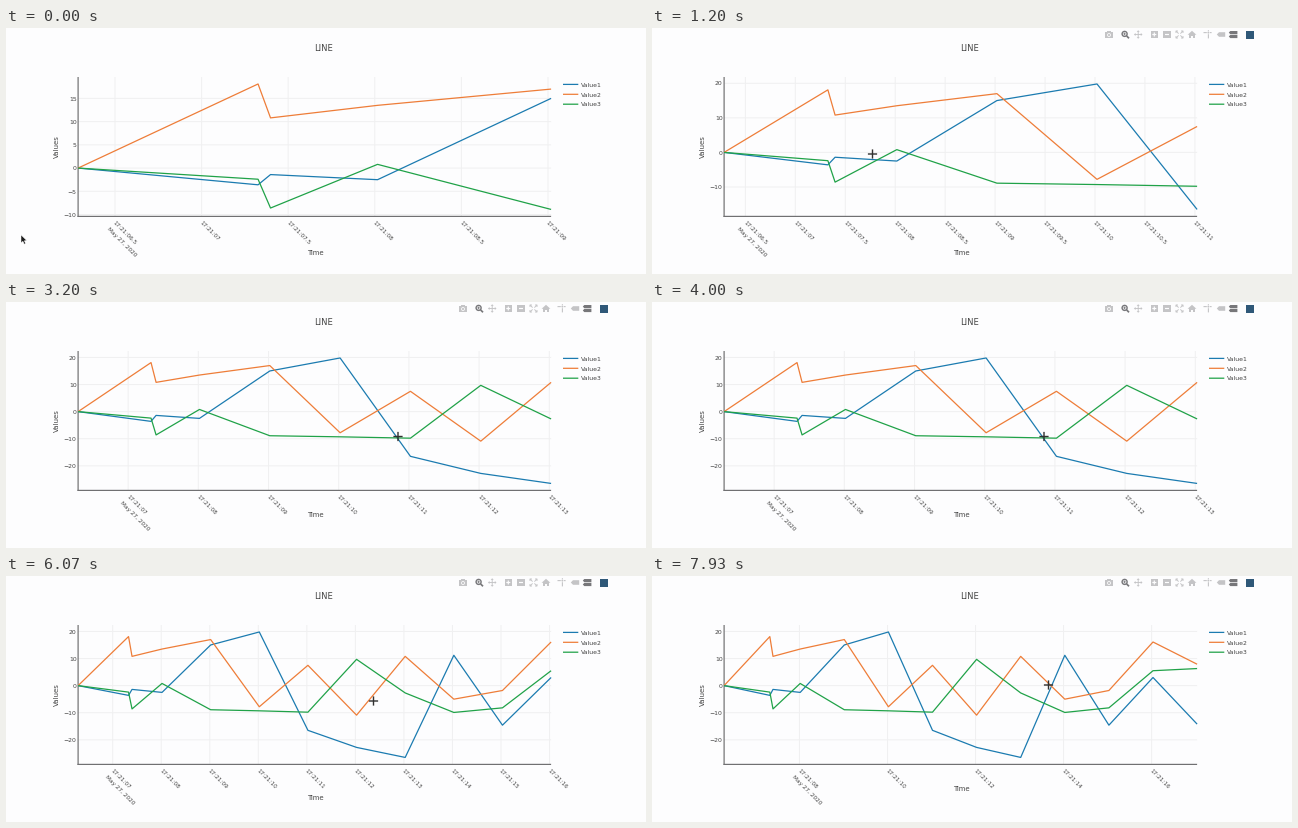
Animation, 640 px wide and 246 px high, one loop 8 s. Source, as a matplotlib script:

```python
import math

import matplotlib.pyplot as plt
from matplotlib.animation import FuncAnimation
from matplotlib.patches import Circle, Polygon, Rectangle

W, H, DPI = 640, 246, 100
FRAMES, STEP = 160, 50
L, R, T, B = 72.1, 545.1, 49.0, 188.4
BG, INK, GRID, AXIS = "#fdfdfe", "#444444", "#f0f0f1", "#707072"
PALE, DARK = "#c4c4c6", "#77777a"
SANS, ARIAL = "DejaVu Sans", "Liberation Sans"

# seconds after 17:21:00
TIMES = [6.287, 7.326, 7.398] + [n * 1.002 for n in range(8, 18)]
SERIES = [
    ("Value1", "#1b7bb0", "white",
     [0, -3.6, -1.4, -2.5, 15, 19.8, -16.5, -22.8, -26.5, 11.2, -14.6, 3, -14.2]),
    ("Value2", "#ee7d38", INK,
     [0, 18.1, 10.8, 13.5, 17, -7.8, 7.5, -10.9, 10.8, -5, -1.8, 16.1, 7.9]),
    ("Value3", "#20a248", "white",
     [0, -2.4, -8.6, 0.8, -8.9, -9.3, -9.8, 9.7, -2.7, -9.9, -8.2, 5.5, 6.3]),
]
# time, x, y of the pointer
PATH = [(0, 15, 206.8), (0.2, 15, 206.8), (0.85, 220.5, 126), (1.4, 220.5, 126),
        (1.95, 274, 131), (2.72, 274, 131), (3.03, 392, 134.5),
        (4.15, 392, 134.5), (4.6, 367.5, 125), (6.4, 367.5, 125),
        (6.9, 396.5, 109), (8, 396.5, 109)]

fig = plt.figure(figsize=(W / DPI, H / DPI), dpi=DPI, facecolor=BG)
ax = fig.add_axes([0, 0, 1, 1])
ax.set_xlim(0, W)
ax.set_ylim(H, 0)
ax.axis("off")
live = []


def px(size):
    return size * 72 / DPI


def line(xs, ys, color, width=1.0, z=2):
    return ax.plot(xs, ys, color=color, lw=px(width), zorder=z, snap=False,
                   solid_capstyle="butt", solid_joinstyle="round")[0]


def label(x, y, s, size, color=INK, ha="left", font=SANS, z=5, rot=0):
    """Text whose capitals are centred on y (or on the turned midline)."""
    a = math.radians(rot)
    d = 0.36 * size
    return ax.text(x + d * math.sin(a), y + d * math.cos(a), s, fontsize=px(size),
                   color=color, ha=ha, va="baseline", family=font, rotation=rot,
                   rotation_mode="anchor", zorder=z)


def poly(pts, fill, edge="none", width=0.0, z=5):
    return ax.add_patch(Polygon(pts, closed=True, fc=fill, ec=edge,
                                lw=px(width), zorder=z))


def box(x, y, w, h, fill, z=5):
    return ax.add_patch(Rectangle((x, y), w, h, fc=fill, ec="none", lw=0, zorder=z))


def disc(x, y, r, fill, edge="none", width=0.0):
    return ax.add_patch(Circle((x, y), r, fc=fill, ec=edge, lw=px(width), zorder=5))


def toolbar():
    y = 6.5
    parts = [box(453, 4.3, 8, 5.5, PALE), box(455.3, 3.2, 3.4, 1.4, PALE),
             disc(457, 7, 1.9, BG), disc(457, 7, 1.1, PALE)]
    # magnifier
    parts += [disc(472.6, 5.9, 2.5, BG, DARK, 1.4),
              line([474.6, 477], [7.9, 10.3], DARK, 1.7, 5),
              line([471.3, 473.9], [5.9, 5.9], DARK, 0.8, 6),
              line([472.6, 472.6], [4.6, 7.2], DARK, 0.8, 6)]
    # four-way arrows
    parts += [line([483, 489.4], [y, y], PALE, 0.9),
              line([486.2, 486.2], [3.3, 9.7], PALE, 0.9)]
    for dx, dy in ((1, 0), (-1, 0), (0, 1), (0, -1)):
        cx, cy = 486.2 + 2.6 * dx, y + 2.6 * dy
        parts.append(poly([(cx + 1.7 * dx, cy + 1.7 * dy),
                           (cx + 1.5 * dy, cy + 1.5 * dx),
                           (cx - 1.5 * dy, cy - 1.5 * dx)], PALE))
    # plus and minus boxes
    for cx in (502.3, 515):
        parts += [box(cx - 3.6, y - 3.6, 7.2, 7.2, PALE),
                  line([cx - 2, cx + 2], [y, y], BG, 1.2, 6)]
    parts.append(line([502.3, 502.3], [y - 2, y + 2], BG, 1.2, 6))
    # autoscale
    for sx in (-1, 1):
        for sy in (-1, 1):
            cx, cy = 527.5 + 3.5 * sx, y + 3.5 * sy
            parts += [line([cx - 2 * sx, cx, cx], [cy, cy, cy - 2 * sy], PALE, 0.9),
                      line([527.5 + 0.9 * sx, cx], [y + 0.9 * sy, cy], PALE, 0.9)]
    # home
    parts += [poly([(535.6, 6.8), (540, 2.8), (544.4, 6.8)], PALE),
              box(537, 6.3, 6, 3.8, PALE), box(539.3, 7.6, 1.4, 2.5, BG, z=6)]
    # spike lines
    parts += [line([551.5, 554.8], [4.6, 4.6], PALE, 1.1), disc(556.4, 4.6, 1, PALE),
              line([558, 559.6], [4.6, 4.6], PALE, 1.1),
              line([556.4, 556.4], [2.2, 3.2], PALE, 1.1),
              line([556.4, 556.4], [6.2, 10.4], PALE, 1.1)]
    # hover modes
    parts.append(poly([(564.8, y), (567, 4.2), (573.2, 4.2), (573.2, 8.8),
                       (567, 8.8)], PALE))
    for cy in (4.6, 8.5):
        parts.append(poly([(576.8, cy), (578.3, cy - 1.6), (585.4, cy - 1.6),
                           (585.4, cy + 1.6), (578.3, cy + 1.6)], DARK))
    parts.append(box(593.8, 2.6, 8, 8, "#2f5878"))
    return parts


def pointer(t):
    for (t0, x0, y0), (t1, x1, y1) in zip(PATH, PATH[1:]):
        if t <= t1:
            u = (t - t0) / (t1 - t0)
            u = u * u * (3 - 2 * u)
            return x0 + (x1 - x0) * u, y0 + (y1 - y0) * u
    return PATH[-1][1:]


def steps(lo, hi, step):
    return [k * step for k in range(math.ceil(lo / step), math.floor(hi / step) + 1)]


def minus(v):
    return f"{v:g}".replace("-", "\u2212")


def text_width(s, size):
    wide = {"\u2212": 0.584, ".": 0.278}
    return size * sum(wide.get(c, 0.556) for c in s)


def draw_axes(sx, sy, t1, lo, hi):
    span = t1 - TIMES[0]
    gap = 0.5 if span < 5 else 1 if span < 10 else 2
    title_y = 213
    for i, s in enumerate(steps(TIMES[0], t1, gap)):
        x, whole = sx(s), s == int(s)
        live.append(line([x, x], [T, B], GRID, 1, 1))
        name = f"17:21:{s:02.0f}" if whole else f"17:21:{s:04.1f}"
        live.append(label(x - 0.7, 193.5, name, 5.8, rot=-45))
        if i == 0:
            live.append(label(x - 6.7, 199.5, "May 27, 2020", 5.8, rot=-45))
        # the axis title gives way to tick labels
        if x - 3 < 318 and x + (18 if whole else 21) > 300:
            title_y = 221.5 if whole else 225
    live.append(label(309, title_y, "Time", 6.9, ha="center"))
    for v in steps(lo, hi, 5 if hi - lo < 33 else 10):
        live.append(line([L, R], [sy(v)] * 2, GRID, 1, 1))
        live.append(label(70.6, sy(v), minus(v), 6.1, ha="right"))


def draw_hover(i, sx, sy):
    x = sx(TIMES[i])
    tags = sorted([sy(vals[i]), name, color, ink, minus(vals[i])]
                  for name, color, ink, vals in SERIES)
    tips = [tag[0] for tag in tags]
    for _ in range(6):
        for a, b in zip(tags, tags[1:]):
            push = max(0, 13 - (b[0] - a[0])) / 2
            a[0] -= push
            b[0] += push
    for tip, (y, name, color, ink, value) in zip(tips, tags):
        x0 = x + 4
        x1 = x0 + text_width(value, 6.9) + 3.4
        live.append(poly([(x + 0.5, tip), (x0, y - 2.5), (x0, y - 5.4), (x1, y - 5.4),
                          (x1, y + 5.4), (x0, y + 5.4), (x0, y + 2.5)],
                         color, ink, 0.6, 8))
        live.append(label((x0 + x1) / 2, y, value, 6.9, ink, "center", ARIAL, 9))
        live.append(label(x1 + 2.4, y, name, 6.7, color, "left", ARIAL, 9))
    live.append(poly([(x, 188.5), (x + 3, 191.6), (x + 42.7, 191.6), (x + 42.7, 202.2),
                      (x - 42.7, 202.2), (x - 42.7, 191.6), (x - 3, 191.6)],
                     INK, "white", 0.5, 8))
    live.append(label(x, 197, f"May 27, 2020, 17:21:{TIMES[i]:06.3f}", 6.75,
                      "white", "center", ARIAL, 9))


def inside(x, y):
    return L <= x <= R and T <= y <= B


def draw_pointer(x, y):
    if inside(x, y):
        live.append(line([x - 4.6, x + 4.6], [y, y], "#303030", 1.4, 12))
        live.append(line([x, x], [y - 4.6, y + 4.6], "#303030", 1.4, 12))
    else:
        shape = [(0, 0), (0, 8.2), (1.9, 6.5), (3.2, 9.4), (4.6, 8.8), (3.4, 6), (5.9, 5.8)]
        live.append(poly([(x + a, y + b) for a, b in shape], "#1c1c1c", "white", 0.5, 12))


def draw(frame):
    while live:
        live.pop().remove()
    t = frame * STEP / 1000
    tick = math.floor(t + 0.96)
    count = 5 + tick
    t0, t1 = TIMES[0], TIMES[count - 1]
    seen = [v for s in SERIES for v in s[3][:count]]
    pad = (max(seen) - min(seen)) / 18
    lo, hi = min(seen) - pad, max(seen) + pad

    def sx(s):
        return L + (s - t0) / (t1 - t0) * (R - L)

    def sy(v):
        return B - (v - lo) / (hi - lo) * (B - T)

    draw_axes(sx, sy, t1, lo, hi)
    xs = [sx(s) for s in TIMES[:count]]
    for _, color, _, vals in SERIES:
        live.append(line(xs, [sy(v) for v in vals[:count]], color, 1.25, 4))

    # new data clears the hover tags until the pointer moves again
    x, y = pointer(t)
    if inside(x, y) and (x, y) != pointer(max(0, tick - 0.96)):
        near = min(range(count), key=lambda i: abs(xs[i] - x))
        if abs(xs[near] - x) < 20:
            draw_hover(near, sx, sy)
    draw_pointer(x, y)
    for part in bar:
        part.set_visible(x > 25)
    return live


bar = toolbar()
label(317.8, 20, "LINE", 8.4, ha="center")
label(50.7, 119, "Values", 7.0, ha="center", rot=90)
line([L, L], [T, B + 0.6], AXIS, 1.2, 3)
line([L - 0.6, R], [B, B], AXIS, 1.2, 3)
for k, (name, color, _, _) in enumerate(SERIES):
    ly = 56.4 + 9.9 * k
    line([557, 572.3], [ly, ly], color, 1.25)
    label(575, ly, name, 6.2)

anim = FuncAnimation(fig, draw, frames=FRAMES, interval=STEP, init_func=lambda: draw(0),
                     repeat=True, repeat_delay=0, blit=False)
plt.show()
```
